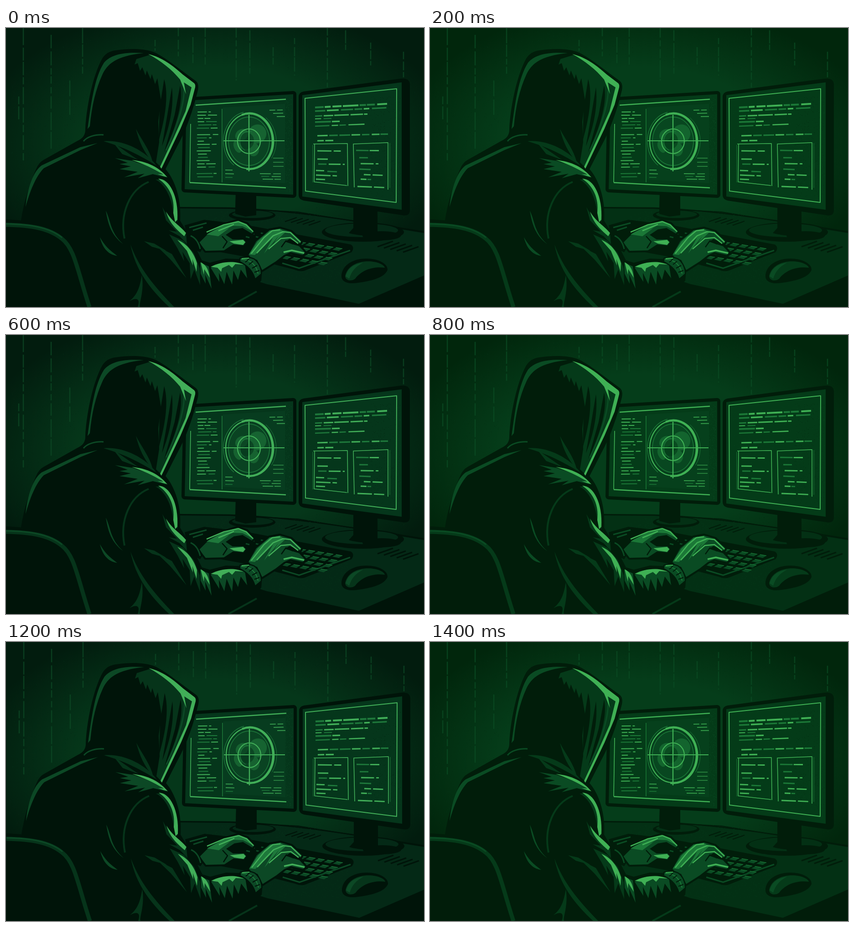
Recreate the animation shown at these times as an HTML page with a canvas. Size 917x611 px, loop 1600 ms.

```html
<!DOCTYPE html>
<html lang="en">
<head>
<meta charset="utf-8">
<title>Night shift</title>
<style>
html, body { margin: 0; width: 100%; height: 100%; overflow: hidden; background: #00140a; }
canvas { display: block; }
</style>
</head>
<body>
<canvas id="stage" width="917" height="611"></canvas>
<script>
const W = 917, H = 611, STEP = 200, STEPS = 8;
const NAMES = ['k', 'edge', 'glow', 'desk', 'scr', 'fold', 'rim', 'mid', 'hi'];
const PALETTES = [
  '#001409 #021c0e #05371a #042916 #05361b #06341a #0c4825 #1e783b #41ae58',
  '#011d0a #01260c #053d1a #033014 #043b18 #053a19 #0a4b23 #1b7837 #3fb054',
  '#012b0d #023610 #05491c #033f17 #05491d #05481d #095825 #1a7f38 #3fb955'
].map(s => Object.fromEntries(s.split(' ').map((c, i) => [NAMES[i], c])));
const NUDGE = [0, 0, -1, 0, 0, 0, 1, 0];

let g, pal, seed;

function rand() {
  seed = (seed * 1664525 + 1013904223) >>> 0;
  return seed / 4294967296;
}

function fill(d, color, edge = 0) {
  const p = new Path2D(d);
  g.fillStyle = pal[color];
  if (edge) {
    g.strokeStyle = pal.k;
    g.lineWidth = edge;
    g.stroke(p);
  }
  g.fill(p);
}

function line(d, color, width) {
  g.strokeStyle = pal[color];
  g.lineWidth = width;
  g.stroke(new Path2D(d));
}

function oval(x, y, rx, ry, color, width = 0, tilt = 0, from = 0, to = 2 * Math.PI) {
  g.beginPath();
  g.ellipse(x, y, rx, ry, tilt, from, to);
  if (width) {
    g.strokeStyle = pal[color];
    g.lineWidth = width;
    g.stroke();
  } else {
    g.fillStyle = pal[color];
    g.fill();
  }
}

// One row of code: short strokes with small gaps along a sloping line.
function row(x, y, end, slope = 0, width = 2.6) {
  const start = x;
  while (x < end - 3) {
    const stop = Math.min(end, x + 12 + rand() * 24);
    line(`M${x},${y + (x - start) * slope} L${stop},${y + (stop - start) * slope}`,
      rand() < .6 ? 'hi' : 'mid', width);
    x = stop + 2 + rand() * 4;
  }
}

function grain(x, y, w, h, color, count, alpha) {
  g.globalAlpha = alpha;
  g.fillStyle = pal[color];
  for (let i = 0; i < count; i++) g.fillRect(x + rand() * w | 0, y + rand() * h | 0, 1, 1);
  g.globalAlpha = 1;
}

function wall() {
  g.fillStyle = pal.edge;
  g.fillRect(0, 0, W, H);
  g.save();
  g.translate(460, 255);
  g.scale(1, .58);
  const light = g.createRadialGradient(0, 0, 0, 0, 0, 530);
  light.addColorStop(0, pal.glow);
  light.addColorStop(.55, pal.glow);
  light.addColorStop(1, pal.edge);
  g.fillStyle = light;
  g.fillRect(-480, -500, 960, 1200);
  g.restore();

  for (let i = 0; i < 2600; i++) {
    const a = rand() * 2 * Math.PI, r = 320 + rand() * 180;
    g.fillStyle = i % 2 ? pal.edge : pal.glow;
    g.globalAlpha = .5;
    g.fillRect(460 + r * Math.cos(a) | 0, 255 + r * .58 * Math.sin(a) | 0, 1, 1);
  }

  g.globalAlpha = .75;
  const streaks = [
    [38, 0, 290], [99, 15, 270], [168, 0, 100], [140, 115, 195], [327, 26, 50], [378, 0, 62],
    [410, 20, 80], [437, 0, 80], [505, 0, 115], [535, 5, 100], [586, 42, 80], [633, 22, 104],
    [705, 0, 130], [745, 5, 48], [800, 32, 82], [872, 52, 108], [28, 150, 200]
  ];
  for (const [x, top, bottom] of streaks) {
    for (let y = top; y < bottom;) {
      const len = 12 + rand() * 28;
      line(`M${x},${y} V${Math.min(bottom, y + len)}`, 'rim', 2.6);
      y += len + 2 + rand() * 6;
    }
  }
  g.globalAlpha = 1;
}

function desk() {
  fill('M370,393 L490,394 L640,402 L917,447 V611 H370Z', 'k');
  fill('M370,395 L490,396 L640,404 L917,449 V542 L774,604 L572,561 L380,500Z', 'desk');
  line('M365,393 L490,394 C600,397 720,415 917,446', 'k', 2.5);
  grain(560, 500, 190, 60, 'glow', 450, .7);
  grain(440, 400, 250, 30, 'glow', 300, .7);
  for (let i = 0; i < 5; i++) {
    line(`M${815 + i * 14},${479 + i * 3} l34,-12`, 'k', 3);
    line(`M${612 + i * 13},${424 + i * 2} l26,-9`, 'k', 2);
  }
}

function target() {
  const x = 533, y = 248;
  g.globalAlpha = .6;
  oval(x, y, 46, 55, 'rim');
  oval(551, 232, 20, 21, 'mid', 0, .5);
  oval(517, 234, 15, 12, 'mid', 0, -.6);
  oval(543, 266, 12, 15, 'mid');
  oval(508, 260, 8, 14, 'mid', 0, -.4);
  oval(528, 247, 16, 18, 'scr');
  g.globalAlpha = 1;
  oval(x, y, 51, 60, 'hi', 2.4);
  oval(x + 1, y, 52, 61, 'hi', 4.5, 0, -1.9, 1.7);
  oval(x, y, 45, 53, 'mid', 1.5);
  oval(x, y, 56, 65, 'mid', 1.4, 0, 2.2, 4.5);
  oval(x, y, 60, 66, 'mid', 1, 0, -.9, .6);
  oval(x, y, 25, 27, 'hi', 2.2);
  oval(x, y, 20, 22, 'mid', 1.2, 0, 2, 5);
  line('M477,247 H611', 'hi', 1.8);
  line('M533,190 V314', 'hi', 2.4);
}

function leftScreen() {
  fill('M504,360 H549 V406 H503Z', 'k');
  oval(540, 410, 51, 12, 'k');
  oval(541, 408, 45, 8, 'desk');
  fill('M504,362 H549 V410 L525,413 L503,407Z', 'k');
  fill('M396,159 L630,145 V365 L392,353Z', 'scr', 14);
  grain(612, 150, 17, 210, 'rim', 240, .9);
  g.globalAlpha = .35;
  fill('M476,174 L612,166 V340 L476,332Z', 'rim');
  g.globalAlpha = 1;
  line('M416,169 L614,156', 'hi', 2.3);
  line('M403,338.5 L614,350', 'hi', 2.3);
  line('M405,210 L403,338', 'hi', 1.6);
  line('M474,177 V338', 'mid', 1.6);
  for (let i = 0; i < 21; i++) {
    if (i !== 6 && i !== 18) row(418 + rand() * 4, 184 + i * 7.1, 440 + rand() * 26, -.01, 2);
  }
  target();
  g.globalAlpha = .8;
  for (let i = 0; i < 3; i++) {
    row(578 + i * 8, 180 + i * 7, 612, -.02, 2);
    row(586, 285 + i * 9, 609, 0, 1.4);
    row(481, 311 + i * 8, 497 + i * 3, .02, 2);
    row(557 + i * 3, 319 + i * 6, 603, .01, 1.8);
  }
  g.globalAlpha = 1;
}

function rightScreen() {
  oval(783, 447, 90, 21, 'k');
  oval(780, 443, 80, 15, 'desk');
  fill('M762,390 L815,398 V449 C800,457 772,455 752,449 L762,438Z', 'k');
  oval(824, 455, 42, 10, 'k');
  fill('M642,151 Q642,141 653,139 L865,111 Q886,109 886,124 V398 Q886,413 870,410 L653,378 Q642,375 642,366Z', 'k');
  fill('M650,147 L868,119 V398 L650,369Z', 'scr');
  grain(651, 148, 216, 220, 'rim', 700, .4);
  grain(800, 150, 65, 220, 'k', 350, .4);
  line('M656,154 L857,133 L856,382 L657,357Z', 'hi', 2);
  row(678, 174, 836, -.05, 4);
  row(678, 182, 838, -.047, 3.4);
  row(678, 193, 793, -.04, 3);
  row(678, 199, 718, -.03, 2);
  row(678, 206, 732, -.03, 3.4);
  row(678, 215, 788, -.04, 2.6);
  row(683, 236, 838, -.024, 3.2);
  row(683, 247, 718, -.02, 3.2);
  line('M674,254 L749,253 L750,346 M677,254 L676,337 L748,345', 'hi', 1.6);
  line('M764,349 L762,254 L838,251 V354', 'hi', 1.6);
  line('M673,256 V338 M842,252 V350', 'mid', 1);
  const rows = [
    [683, 269, 742], [683, 287, 706], [685, 298, 743], [680, 312, 698], [705, 314, 726],
    [680, 322, 726], [680, 331, 700], [768, 268, 818], [775, 284, 796], [778, 297, 817],
    [775, 309, 800], [785, 321, 828], [778, 331, 801], [771, 347, 830]
  ];
  for (const [x, y, end] of rows) row(x, y, end, y > 305 ? .04 : .01, 2.8);
}

function keyboard() {
  fill('M392,432 L435,420 L520,430 L756,474 Q766,480 758,491 L656,531 Q646,535 632,529 L520,500 L400,478Z', 'k');
  line('M606,515 L643,526 L755,487', 'rim', 3);
  for (let r = 0; r < 4; r++) {
    for (let c = 0; c < 5; c++) {
      const x = 644 + c * 20 - r * 11, y = 468 + c * 3.2 + r * 10.5;
      if (x + r * 8 < 738) fill(`M${x},${y} l14,2.5 l-8,5 l-14,-3Z`, 'rim');
      if (x + r * 8 < 738) line(`M${x},${y} l14,2.5`, 'mid', 1.2);
    }
  }
  for (let c = 0; c < 5; c++) line(`M${526 + c * 11},${457 - c % 2 * 8} l8,2`, 'rim', 3);
  line('M402,437 L440,427 M410,443 L432,436', 'rim', 3);
}

function mouse() {
  fill('M736,546 C735,522 758,505 790,505 C819,505 838,517 837,530 C829,548 800,554 772,558 C753,561 739,558 736,546Z', 'k');
  fill('M744,543 C749,520 773,510 798,511 C817,512 830,519 831,525 C808,522 782,528 766,549 C757,556 744,553 744,543Z', 'fold');
  fill('M745,544 C750,525 763,517 783,514 C766,523 758,533 753,549Z', 'rim');
}

function hands() {
  fill('M424,470 L446,448 L478,431 L508,422 L528,429 L544,446 L539,450 L519,438 L500,441 L482,453 L497,463 L521,463 L526,469 L521,476 L498,474 L478,487 L438,488Z', 'rim', 8);
  fill('M440,452 L474,434 L508,423 L527,430 L543,446 L519,434 L498,433 L470,447 L490,438 L466,456Z', 'mid');
  line('M440,447 L478,431 L510,424 L527,431 L542,446 M466,444 L500,430', 'hi', 2.5);
  fill('M490,467 L520,464 L525,469 L520,475 L500,472Z', 'hi');
  line('M476,482 L485,468 L474,456', 'k', 2.5);

  fill('M532,497 L549,467 L578,443 L601,439 L625,446 L648,467 L645,472 L622,462 L612,468 L643,478 L656,492 L651,497 L624,491 L610,497 L592,511 L562,530Z', 'rim', 8);
  fill('M533,496 L552,467 L579,444 L601,440 L612,448 L588,471 L598,455 L566,494 L586,459 L546,497Z', 'mid');
  line('M538,494 L566,459 L584,444 L601,442 M550,493 L586,455 L608,446 L624,448 L646,469', 'hi', 2.6);
  line('M576,484 L603,461 L624,459 L641,472', 'hi', 2.4);
  line('M609,491 L627,487 L654,493', 'hi', 3.4);
  line('M604,480 L614,466 L630,473', 'k', 2.5);
}

function hood() {
  // Lit side of the hood, with a ragged inner edge.
  fill('M286,68 L315,59 L360,82 L411,124 L402,166 L374,238 L340,305 L329,294 L336,250 L334,205 L340,158 L332,110 L327,123 L320,101 L317,112 L309,93 L306,104 L299,86 L294,94 L289,77 L282,80Z', 'fold');
  fill('M347,112 C357,145 350,195 335,247 L337,175 Z M364,130 C368,165 362,210 342,259 L354,190Z M382,126 C389,160 376,211 347,272 L370,190Z', 'k');
  line('M389,118 C396,149 381,205 351,268', 'rim', 3.5);
  fill('M312,57 C342,64 367,83 388,102 L413,121 Q416,124 415,130 L405,168 L383,220 L341,308 L338,304 L368,240 L394,182 L407,130 L390,119 L395,145 L382,113 C364,91 340,72 312,57Z', 'hi');
  fill('M302,55 C262,52 231,57 215,76 C194,109 187,163 179,221 L184,215 C188,170 197,134 211,103 C222,79 241,61 302,55Z', 'rim');
  line('M170,248 C178,238 195,233 214,234', 'rim', 3);
}

function jacket() {
  fill('M43,392 C47,350 60,314 78,301 L163,261 L201,252 L164,267 L83,307 C65,325 52,359 43,392Z', 'rim');
  fill('M214,248 C255,244 303,266 330,301 C302,285 272,265 214,248Z M285,221 C298,246 315,266 322,294 C302,272 292,249 285,221Z M236,252 L290,289 L255,276Z', 'fold');
  fill('M239,285 L278,291 L325,307 L351,327 L322,320 L289,329 L304,319 L259,327 L289,315 L249,309 L274,303 L249,298 L267,295Z', 'rim');
  fill('M276,289 C311,292 337,306 354,327 L333,320 L345,321 C321,306 302,298 276,289Z', 'hi');

  line('M313,337 C271,354 249,407 260,461', 'fold', 4);
  fill('M219,400 C231,425 228,447 257,473 C231,454 224,430 219,400Z M206,458 C219,481 230,488 244,499 C222,496 211,479 206,458Z', 'rim');
  fill('M273,474 C292,526 323,563 369,611 H358 C315,571 284,530 273,474Z M298,541 C304,577 291,603 294,611 H289 C294,596 290,588 271,598 C289,584 294,565 298,541Z', 'fold');
  line('M488,611 L550,577', 'fold', 4);

  fill('M328,332 C349,342 363,371 367,404 L376,426 C376,381 368,345 346,332Z', 'fold');
  fill('M334,330 C359,330 379,369 376,420 L371,425 L367,405 C371,373 358,346 334,330Z', 'hi');
  fill('M343,392 C360,425 377,432 395,452 L397,473 L381,456 L357,443 L375,446 L351,421Z', 'fold');
  fill('M351,402 C366,426 380,431 395,449 L391,456 C377,443 360,431 351,402Z', 'hi');
  fill('M358,452 L389,466 L412,493 L425,526 L426,563 L413,529 L405,550 L403,515 L387,490 L391,511 L376,482Z', 'fold');
  fill('M376,464 C398,472 413,494 419,515 L418,534 L409,506 L410,520 L397,488Z', 'hi');
  fill('M426,514 L445,522 L451,571 L437,540 L438,560 L427,538Z M449,525 L484,514 L524,517 L529,548 L515,529 L509,552 L499,531 L496,562 L484,534 L479,561 L467,536 L468,556Z', 'rim');
  fill('M427,513 C437,518 444,526 447,547 L435,528 L434,540Z M449,523 C471,511 502,509 521,518 L503,517 L496,525 L489,519 L474,526 L472,534 L464,525Z', 'hi');
  fill('M331,478 L364,495 L396,548 L360,506Z M303,467 L325,472 L352,488 L320,479Z', 'fold');
}

function figure() {
  fill('M33,422 C38,385 54,336 66,309 Q72,294 84,288 L157,247 Q175,239 174,221 C176,178 189,107 211,67 Q221,51 240,49 C272,44 307,45 327,54 C352,66 376,87 415,115 Q424,121 421,136 C411,178 396,222 375,260 L350,309 C371,333 385,375 382,422 L397,447 L414,478 L430,509 L447,514 L482,505 L511,506 L527,500 L551,508 L562,530 L560,553 L545,570 L490,611 H0 V420Z', 'k');
  hood();
  jacket();
  fill('M397,451 L413,451 L432,481 L426,491 L410,484Z', 'k');
  line('M405,455 C417,460 423,471 426,484', 'rim', 3);
  fill('M514,505 Q529,500 544,507 Q558,518 559,538 L547,548 Q540,524 514,511Z', 'rim', 5);
  line('M516,507 C537,506 549,520 553,538', 'mid', 2);
  line('M525,513 l8,-7 M533,518 l9,-7 M540,526 l11,-6 M545,535 l11,-4', 'k', 2);
  line('M517,505 L533,504', 'hi', 2);
}

function chair() {
  fill('M0,419 C51,422 101,428 128,450 C152,471 162,511 190,611 H0Z', 'k');
  line('M0,431 C53,432 94,438 122,461 C151,483 156,530 183,611', 'fold', 9);
  line('M0,429 C53,430 94,436 123,459', 'rim', 3);
}

function render(palette) {
  const sheet = document.createElement('canvas');
  sheet.width = W;
  sheet.height = H;
  g = sheet.getContext('2d');
  g.lineJoin = 'round';
  pal = palette;
  seed = 71;
  [wall, desk, leftScreen, rightScreen, keyboard, mouse, hands, figure, chair].forEach(draw => draw());
  return sheet;
}

const sheets = PALETTES.map(render);
const view = document.getElementById('stage').getContext('2d');
const start = performance.now();

function play() {
  const step = Math.floor((performance.now() - start) / STEP) % STEPS;
  const tone = step % PALETTES.length;
  view.fillStyle = PALETTES[tone].k;
  view.fillRect(0, 0, W, H);
  view.drawImage(sheets[tone], NUDGE[step], 0);
  requestAnimationFrame(play);
}
play();
</script>
</body>
</html>
```
